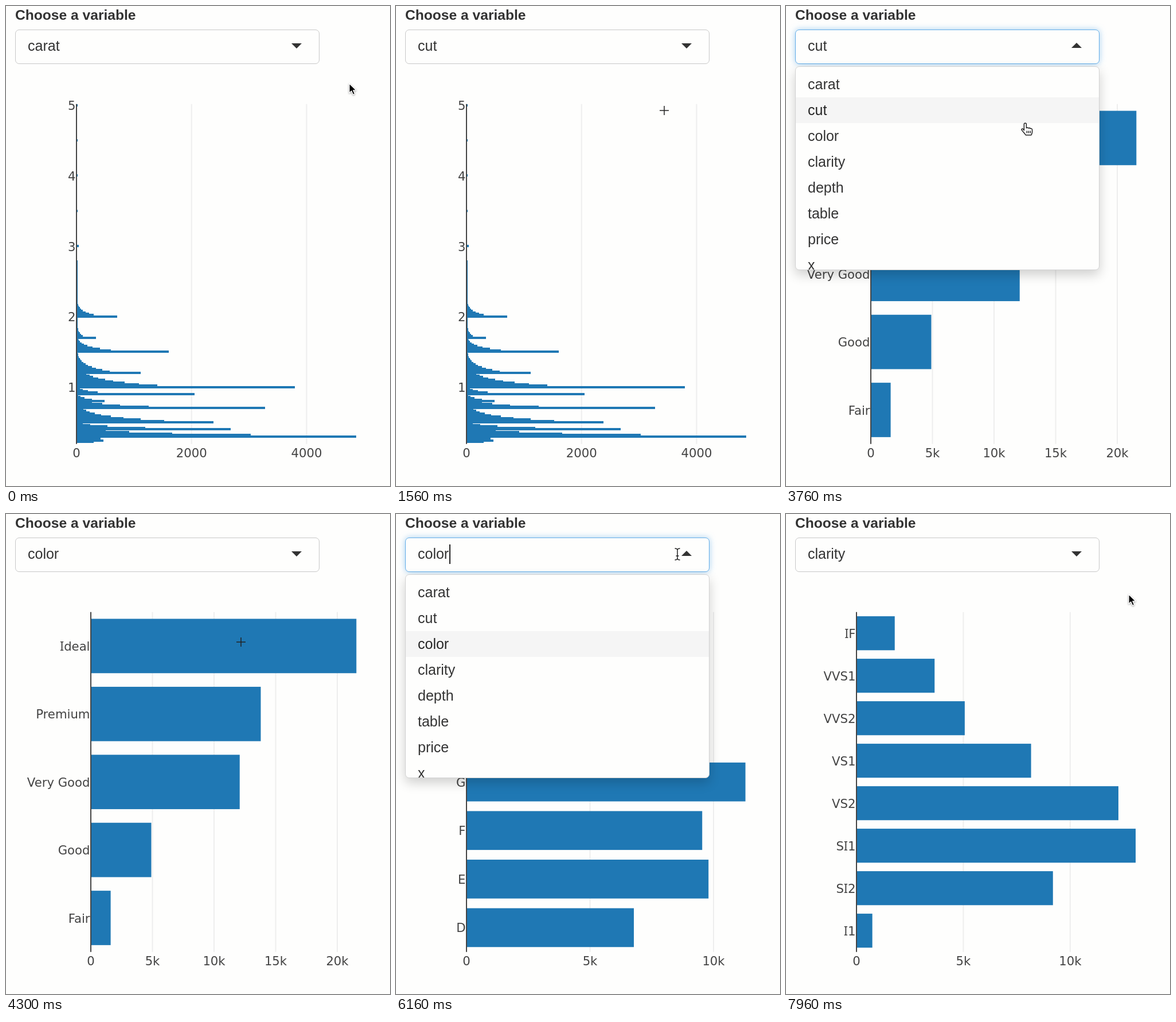
Recreate the animation shown at these times as an HTML page. Size 670 by 836 pixels, loop 8000 ms.

```html
<!DOCTYPE html>
<html lang="en">
<head>
<meta charset="utf-8">
<title>Variable explorer</title>
<style>
  html, body { margin: 0; width: 100%; height: 100%; overflow: hidden; background: #fefefd; }
  body { position: relative; color: #333; font: 25px/45px "Liberation Sans", Arial, sans-serif; }
  body > * { position: absolute; box-sizing: border-box; }
  svg { left: 0; top: 0; width: 670px; height: 836px; }
  #chart text { font: 21.2px "DejaVu Sans", Verdana, sans-serif; fill: #444; }
  #chart .serif { font-family: "Noto Sans", sans-serif; }
  #chart .hook { font-family: "DejaVu Sans Mono", monospace; }
  #label { left: 16px; top: .5px; font-weight: bold; font-size: 24.6px; line-height: 30px; white-space: nowrap; }
  #select, #menu { left: 16px; width: 531px; background: #fefefd; border-radius: 7px; }
  #select { top: 40.5px; height: 60px; padding-left: 21px; border: 1px solid #c8c8c8; line-height: 55px; }
  #select.open { border-color: #66afe9; box-shadow: 0 0 11px rgba(102, 175, 233, .6); }
  #bar { position: absolute; top: 11px; height: 34px; margin-left: 1px; border-left: 2px solid #222; }
  #arrow { position: absolute; left: 481px; top: 23.5px; border: 9px solid transparent; border-top-color: #333; border-bottom-width: 0; }
  .open #arrow { top: 22px; border-width: 0 9px 9px; border-bottom-color: #333; }
  #menu { top: 105px; height: 355px; padding-top: 8px; border: 1px solid #d3d3d3; overflow: hidden; box-shadow: 0 8px 20px rgba(0, 0, 0, .19); }
  #menu div { padding-left: 21px; height: 45px; }
  #menu .active { background: #f5f5f5; color: #262626; }
  #pointer path { display: none; fill: none; stroke: #222; stroke-width: 1.5; stroke-linejoin: round; }
  #pointer .hand { fill: #fff; }
  #pointer .arrow { fill: #000; stroke: #fff; stroke-width: 1.3; filter: drop-shadow(0 1.5px 1.5px rgba(0, 0, 0, .4)); }
</style>
</head>
<body>
<svg id="chart"></svg>
<div id="label">Choose a variable</div>
<div id="select"><span id="value"></span><span id="bar"></span><i id="arrow"></i></div>
<div id="menu"></div>
<svg><g id="pointer">
  <path class="arrow" d="M0 0V16.5l3.8-3.6 2.8 6.4 3-1.3-2.8-6.2h5.2z"/>
  <path class="hand" d="M-2 12V1.5a2 2 0 0 1 4 0V8q2-1.6 3.6.4q2-1.2 3.4.6q3-.6 3.2 2.4v4q-.4 2.6-1.8 5H1q-2-2.6-4-5l-3.4-4.4q.4-2.6 2.6-1.4zM3 13v4M6 13v4M9 13v4"/>
  <path class="cross" d="M-8 0H8M0-8V8"/>
  <path class="beam" d="M-4.5-10Q0-10 0-7Q0-10 4.5-10M0-7.5V7.5M-4.5 10Q0 10 0 7Q0 10 4.5 10M-2.5 3H2.5"/>
</g></svg>
<script>
const LOOP = 8000, TOP = 170.7, HEIGHT = 592, BLUE = '#1f78b4';
const $ = id => document.getElementById(id);

// unit: value between gridlines, gap: their distance in pixels
const charts = {
  carat: { x0: 123, unit: 2000, gap: 200.7, lines: 2 },
  cut: { x0: 148, unit: 5000, gap: 107.5, lines: 4,
    bars: { Ideal: 21551, Premium: 13791, 'Very Good': 12082, Good: 4906, Fair: 1610 } },
  color: { x0: 123, unit: 5000, gap: 215.5, lines: 2,
    bars: { J: 2808, I: 5422, H: 8304, G: 11292, F: 9542, E: 9797, D: 6775 } },
  clarity: { x0: 123, unit: 5000, gap: 186.4, lines: 2,
    bars: { IF: 1790, VVS1: 3655, VVS2: 5066, VS1: 8171, VS2: 12258, SI1: 13065, SI2: 9194, I1: 741 } },
};

// Stones cluster just above round weights: a spike, then a decaying tail
const spikes = [
  { at: .22, peak: 298, tail: 466, decay: .9 },
  { at: .3, peak: 4862, tail: 3029, decay: .55 },
  { at: .4, peak: 2681, tail: 1194, decay: .45 },
  { at: .5, peak: 2385, tail: 1526, decay: .73 },
  { at: .7, peak: 3275, tail: 1256, decay: .6 },
  { at: .8, peak: 484, tail: 271, decay: .5 },
  { at: .9, peak: 2055, tail: 368, decay: .55 },
  { at: 1, peak: 3800, tail: 1406, decay: .77 },
  { at: 1.2, peak: 1118, tail: 579, decay: .77 },
  { at: 1.5, peak: 1600, tail: 601, decay: .68 },
  { at: 1.7, peak: 334, tail: 105, decay: .75 },
  { at: 2, peak: 705, tail: 299, decay: .72 },
];
const BIN = .02;

function stones(v) {
  if (v > 2.8) return Math.round(v * 100) % 50 === 0 ? (v < 3.2 ? 36 : 17) : 0;
  const s = spikes.filter(s => s.at < v + .001).pop();
  const k = Math.round((v - s.at) / BIN);
  const n = k ? s.tail * s.decay ** (k - 1) : s.peak;
  return Math.max(n, v < 2.5 ? 24 : 15);
}

const rect = (x, y, w, h, extra = '') => `<rect x="${x}" y="${y}" width="${w}" height="${h}" fill="${BLUE}" ${extra}/>`;
const vline = (x, color) => `<path d="M${x} ${TOP}v${HEIGHT}" stroke="${color}" stroke-width="2"/>`;
const text = (x, y, anchor, s) => `<text x="${x}" y="${y}" text-anchor="${anchor}">` +
  s.replace(/I/g, '<tspan class="serif">I</tspan>').replace('J', '<tspan class="hook">J</tspan>') + '</text>';

function histogram({ x0, unit, gap }) {
  const yOf = v => 664 - 122.75 * (v - 1);
  let out = '';
  for (let v = .22; v < 5.01; v += BIN) {
    const n = stones(v);
    if (n) out += rect(x0, Math.round(yOf(v + .003)) - 2, n * gap / unit, 4, 'shape-rendering="crispEdges"');
  }
  for (let v = 1; v <= 5; v++) out += text(x0 - 1.5, yOf(v) + 8, 'end', String(v));
  return out;
}

function categories({ x0, unit, gap, bars }) {
  const rows = Object.entries(bars), step = HEIGHT / rows.length;
  return rows.map(([name, n], i) => {
    const y = TOP + step * i;
    return rect(x0, y + step * .1, n * gap / unit, step * .8) + text(x0 - 1.5, y + step / 2 + 8, 'end', name);
  }).join('');
}

function chartMarkup(c) {
  let grid = '', labels = '';
  for (let i = 0; i <= c.lines; i++) {
    const x = c.x0 + i * c.gap, v = i * c.unit;
    grid += vline(x, '#eee');
    labels += text(x, 785.7, 'middle', c.bars && v ? v / 1000 + 'k' : String(v));
  }
  return grid + (c.bars ? categories(c) : histogram(c)) + vline(c.x0, '#444') + labels;
}

const names = ['carat', 'cut', 'color', 'clarity', 'depth', 'table', 'price', 'x'];
$('menu').innerHTML = names.map(n => `<div>${n}</div>`).join('');
$('chart').innerHTML = Object.keys(charts).map(n => `<g id="chart-${n}">${chartMarkup(charts[n])}</g>`).join('');

// Each choice: menu opens, item is picked, chart follows
const choices = [
  { name: 'cut', open: 630, pick: 1530, plot: 1800 },
  { name: 'color', open: 3200, pick: 4230, plot: 4360 },
  { name: 'clarity', open: 6130, pick: 7160, plot: 7460 },
];
const latest = (key, t) => choices.reduce((name, c) => t >= c[key] ? c.name : name, 'carat');

// Pointer moves: start, end, x, y
const home = [599, 135];
const moves = [
  [30, 360, 519, 80], [960, 1500, 468, 182], [2000, 2430, 468, 77], [3430, 3960, 410, 223],
  [4530, 4930, 587, 95], [5730, 6000, 491, 70], [6400, 6630, 484, 303], [6900, 7060, 488, 275],
  [7160, 7300, 560, 232], [7460, 7660, 594, 189], [7830, 7960, 598, 140]];
const STEP = 30;
const ease = p => { const q = 1 - (1 - p) ** 1.45; return q * q * (3 - 2 * q); };

function pointerAt(t) {
  let [x, y] = home;
  for (const [start, end, tx, ty] of moves) {
    if (t < start) break;
    const k = ease(Math.min(1, (t - start + STEP) / (end - start + STEP)));
    x += (tx - x) * k;
    y += (ty - y) * k;
  }
  return [x, y];
}

function pointerKind(x, y, open, x0) {
  if (x > 16 && x < 547) {
    if (y > 40 && y < 101) return open ? 'beam' : 'hand';
    if (open && y < 460) return 'hand';
  }
  return x > x0 && x < 640 && y > TOP && y < TOP + HEIGHT ? 'cross' : 'arrow';
}

function draw(t) {
  const current = choices.find(c => t >= c.open && t < c.pick);
  const [x, y] = pointerAt(t), value = latest('pick', t), plot = latest('plot', t);

  for (const n in charts) $('chart-' + n).style.display = n === plot ? '' : 'none';
  $('value').textContent = value;
  $('select').className = current ? 'open' : '';
  $('bar').style.display = current && (t - current.open) % 1000 < 500 ? '' : 'none';
  $('menu').style.display = current ? '' : 'none';

  const active = y > 116 ? Math.floor((y - 116) / 45) : names.indexOf(value);
  [...$('menu').children].forEach((row, i) => row.className = i === active ? 'active' : '');

  const kind = pointerKind(x, y, !!current, charts[plot].x0);
  $('pointer').setAttribute('transform', `translate(${x} ${y})`);
  for (const p of $('pointer').children) p.style.display = p.classList.contains(kind) ? 'inline' : 'none';
}

const begin = performance.now();
function frame() {
  draw((performance.now() - begin) % LOOP);
  requestAnimationFrame(frame);
}
frame();
</script>
</body>
</html>
```
